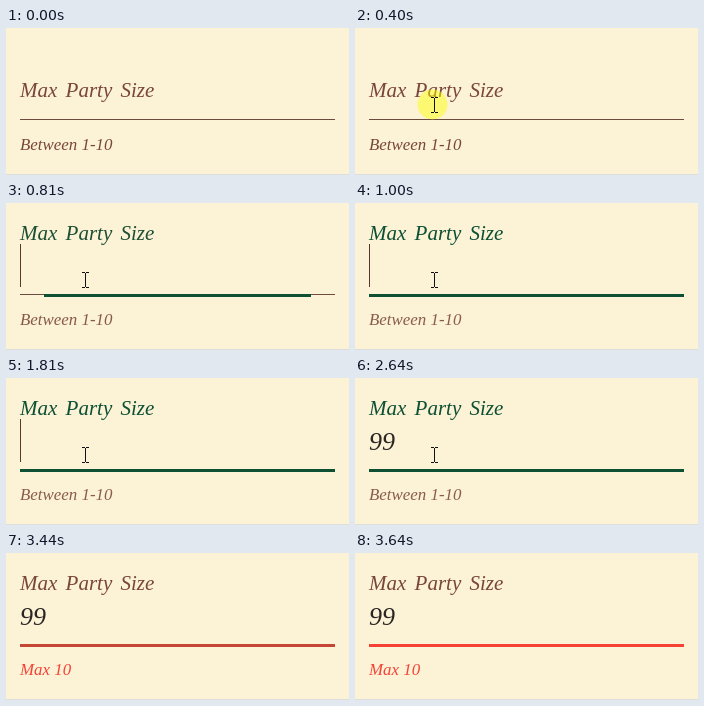
These frames come from a looping animation (343 by 147 pixels, 4.44 s). An HTML page:

```html
<!DOCTYPE html>
<html lang="en">
<head>
<meta charset="utf-8">
<title>Party size field</title>
<style>
html, body { margin: 0; width: 100%; height: 100%; overflow: hidden; background: #fcf2d6; }
svg { display: block; }
text { font-family: "Liberation Serif", "Times New Roman", serif; font-style: italic; }
#label { font-size: 21px; word-spacing: 3px; }
#value { font-size: 26px; fill: #2b2624; }
#hint { font-size: 16.9px; }
rect, #pointer { shape-rendering: crispEdges; }
</style>
</head>
<body>
<svg width="343" height="147" viewBox="0 0 343 147">
  <rect width="343" height="147" fill="#fcf2d6"/>
  <rect y="146" width="343" height="1" fill="#dddddb"/>
  <text id="label" x="14">Max Party Size</text>
  <text id="value" x="14" y="72"></text>
  <rect id="caret" y="41" width="1" height="43"/>
  <rect x="14" y="91" width="315" height="1" fill="#6f4a40"/>
  <rect id="underline" y="91" height="3"/>
  <text id="hint" x="14" y="122"></text>
  <circle id="click" cx="77.5" cy="76.5" r="15" fill="#ff0" fill-opacity=".47"/>
  <path id="pointer" d="M76 69h3v1h1v-1h3v1h-3v14h3v1h-3v-1h-1v1h-3v-1h3v-14h-3z" fill="#111"/>
</svg>
<script>
const LOOP = 4440;
const LEFT = 14, WIDTH = 315;
const BROWN = [121, 70, 60], FADED = [138, 92, 78], GREEN = [13, 80, 52], RED = [244, 67, 54];
const { label, value, caret, underline, hint, click, pointer } = Object.fromEntries(
  [...document.querySelectorAll("[id]")].map(el => [el.id, el]));

const rgb = c => `rgb(${c.map(Math.round)})`;
const mix = (a, b, k) => rgb(a.map((v, i) => v + (b[i] - v) * k));
const show = (el, on) => el.setAttribute("visibility", on ? "visible" : "hidden");

function render(t) {
  const within = (from, to) => t >= from && t < to;
  const floated = t >= 810;
  const invalid = t >= 3440;
  const focus = t < 810 ? 0 : t < 1000 ? 0.85 : 1;
  const typed = t < 2000 ? 0 : t < 2200 ? 1 : 2;

  label.setAttribute("y", floated ? 37 : 69);
  label.setAttribute("fill", invalid ? rgb(BROWN) : mix(BROWN, GREEN, focus));

  value.textContent = "9".repeat(typed);
  caret.setAttribute("x", [14, 26, 39][typed]);
  caret.setAttribute("fill", typed ? "#2b2624" : "#59372f");
  show(caret, within(810, 1200) || within(1810, 2640) || within(3240, 3440));

  const width = WIDTH * focus;
  underline.setAttribute("x", LEFT + (WIDTH - width) / 2);
  underline.setAttribute("width", width);
  underline.setAttribute("fill", mix(GREEN, RED, t < 3440 ? 0 : t < 3640 ? 0.8 : 1));

  hint.textContent = invalid ? "Max 10" : "Between 1-10";
  hint.setAttribute("fill", invalid ? rgb(RED) : mix(BROWN, FADED, focus));

  show(click, within(400, 620));
  show(pointer, within(200, 2840));
}

const start = performance.now();
function tick() {
  render((performance.now() - start) % LOOP);
  requestAnimationFrame(tick);
}
tick();
</script>
</body>
</html>
```
